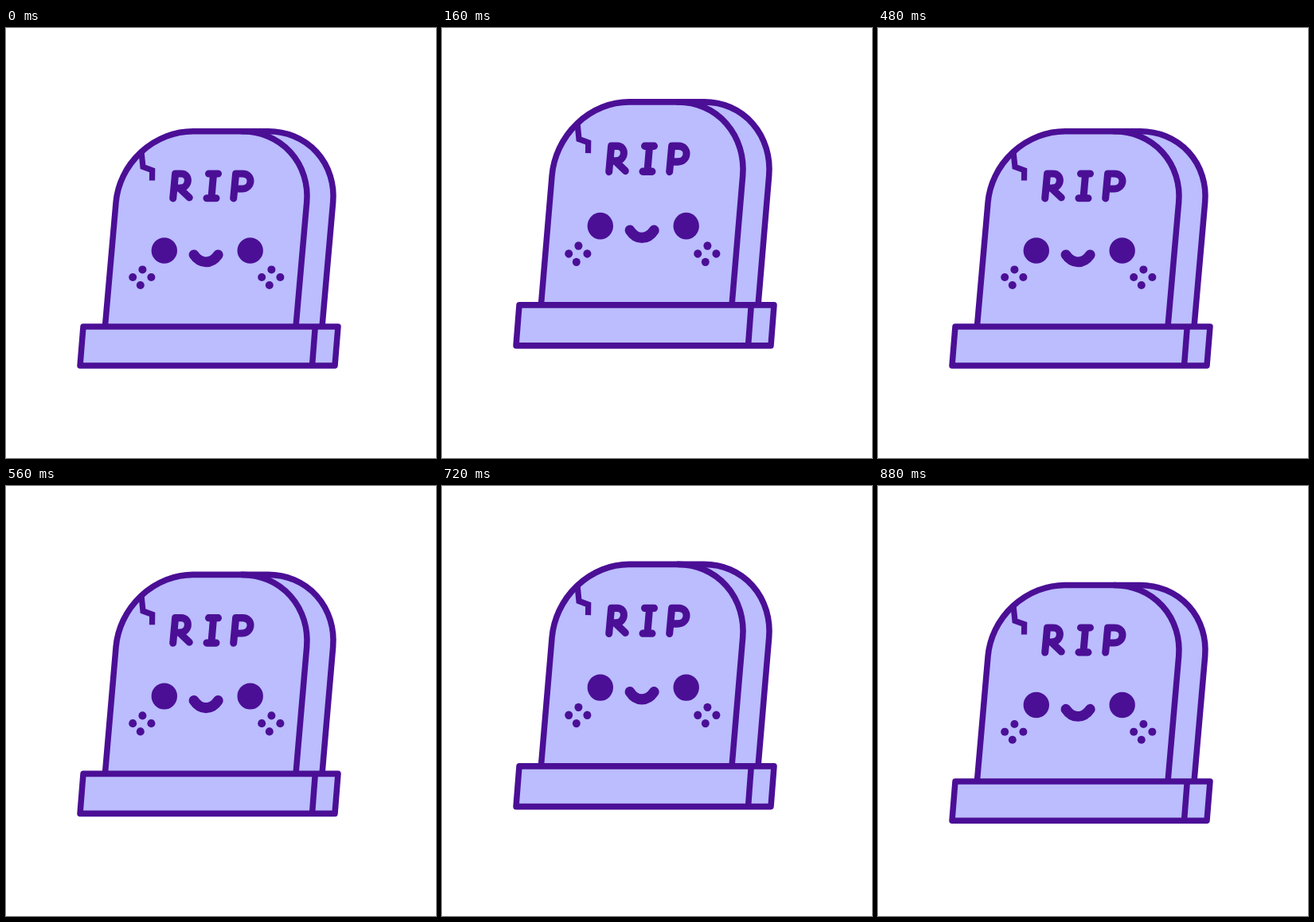
Animation, 540 px wide and 540 px high, one loop 0.96 s. Source, as an HTML page with a canvas:

```html
<!DOCTYPE html>
<html lang="en">
<head>
<meta charset="utf-8">
<title>Bouncing tombstone</title>
<style>
  html, body { margin: 0; width: 100%; height: 100%; overflow: hidden; background: #fff; }
  canvas { display: block; width: 540px; height: 540px; }
</style>
</head>
<body>
<canvas id="stage" width="540" height="540"></canvas>
<script>
const ctx = document.getElementById('stage').getContext('2d');
const INK = '#4b0f96', STONE = '#bbbdff';
const STEP = 80, LOOP = 960, BOUNCE = 480;
const FLOOR = 428, LEAN = 0.0875, BASE_Y = 375, TOP_Y = 129.8, RADIUS = 89;

const ease = u => (1 - Math.cos(Math.PI * u)) / 2;

// Height of the hop, 0..1: quick rise, slower fall.
function hop(time) {
  const t = time % BOUNCE;
  return t < 160 ? ease(t / 160) : 1 - ease((t - 160) / 320);
}

// Eye opening: one blink per loop, closing fast and opening slowly.
function eyeOpen(time) {
  const closed = 0.15;
  if (time <= 160 || time >= 400) return 1;
  const shut = time < 240 ? ease((time - 160) / 80) : 1 - ease((time - 240) / 160);
  return 1 - (1 - closed) * shut;
}

// Builds a path in leaning coordinates, whose x is measured at the base line.
function leaning(build) {
  ctx.save();
  ctx.transform(1, 0, -LEAN, 1, LEAN * BASE_Y, 0);
  ctx.beginPath();
  build();
  ctx.restore();
}

function arch(left, right) {
  ctx.moveTo(left, BASE_Y);
  ctx.lineTo(left, TOP_Y + RADIUS);
  ctx.arc(left + RADIUS, TOP_Y + RADIUS, RADIUS, Math.PI, Math.PI * 1.5);
  shoulder(right);
}

function shoulder(right) {
  ctx.lineTo(right - RADIUS, TOP_Y);
  ctx.arc(right - RADIUS, TOP_Y + RADIUS, RADIUS, -Math.PI / 2, 0);
  ctx.lineTo(right, BASE_Y);
}

function stroke(width, cap = 'round', join = 'round') {
  ctx.lineWidth = width;
  ctx.lineCap = cap;
  ctx.lineJoin = join;
  ctx.stroke();
}

function line(...points) {
  ctx.beginPath();
  points.forEach(([x, y]) => ctx.lineTo(x, y));
}

function blob(x, y, rx, ry = rx) {
  ctx.beginPath();
  ctx.ellipse(x, y, rx, ry, 0, 0, Math.PI * 2);
  ctx.fill();
}

function drawStone() {
  ctx.fillStyle = STONE;
  leaning(() => arch(124.4, 397));
  ctx.fill();
  leaning(() => { ctx.moveTo(275, TOP_Y); shoulder(397); });
  stroke(7.5);
  leaning(() => arch(124.4, 364));
  stroke(7.5);

  line([170, 155], [172, 174.5], [183.7, 178.7], [183.5, 191.5]);
  stroke(7.2, 'butt', 'miter');

  line([97, 375], [417, 375], [413, 424], [93, 424]);
  ctx.closePath();
  ctx.fill();
  stroke(7.5);
  line([388.3, 375], [384.5, 424]);
  stroke(7.5, 'butt');
}

function drawLetters() {
  ctx.beginPath();
  // R
  ctx.moveTo(209.7, 214);
  ctx.lineTo(212.6, 183);
  ctx.lineTo(220, 183);
  ctx.bezierCurveTo(232, 183, 231, 201, 218, 201);
  ctx.lineTo(211, 201);
  ctx.moveTo(218, 201.5);
  ctx.lineTo(230.3, 213);
  // I
  ctx.moveTo(254.5, 183);
  ctx.lineTo(266.5, 183);
  ctx.moveTo(260.6, 183);
  ctx.lineTo(257.9, 213.8);
  ctx.moveTo(252, 213.8);
  ctx.lineTo(264, 213.8);
  // P
  ctx.moveTo(285.7, 214);
  ctx.lineTo(288.6, 183);
  ctx.lineTo(297, 183);
  ctx.bezierCurveTo(311, 183, 310, 202, 296, 202);
  ctx.lineTo(287, 202);
  stroke(9);
}

function drawFace(open) {
  ctx.fillStyle = INK;
  for (const x of [198.8, 306.7]) blob(x, 279.5, 16.2, 16.2 * open);

  ctx.beginPath();
  ctx.moveTo(236, 284.8);
  ctx.bezierCurveTo(244, 296.8, 258, 296.8, 266.3, 284.8);
  stroke(12.8);

  for (const dx of [0, 162]) {
    blob(171.4 + dx, 303.4, 5);
    blob(159.2 + dx, 313, 5);
    blob(182.4 + dx, 313, 5);
    blob(168.8 + dx, 323, 5);
  }
}

function draw(time) {
  const height = hop(time);
  const stretch = 1 + height * 12 / 302;
  ctx.setTransform(1, 0, 0, 1, 0, 0);
  ctx.fillStyle = '#fff';
  ctx.fillRect(0, 0, 540, 540);
  ctx.translate(0, FLOOR - 25 * height);
  ctx.scale(1, stretch);
  ctx.translate(0, -FLOOR);
  ctx.strokeStyle = INK;
  drawStone();
  drawLetters();
  drawFace(eyeOpen(time));
}

const start = performance.now();
function tick() {
  const elapsed = (performance.now() - start) % LOOP;
  draw(Math.floor(elapsed / STEP) * STEP);
  requestAnimationFrame(tick);
}
tick();
</script>
</body>
</html>
```
